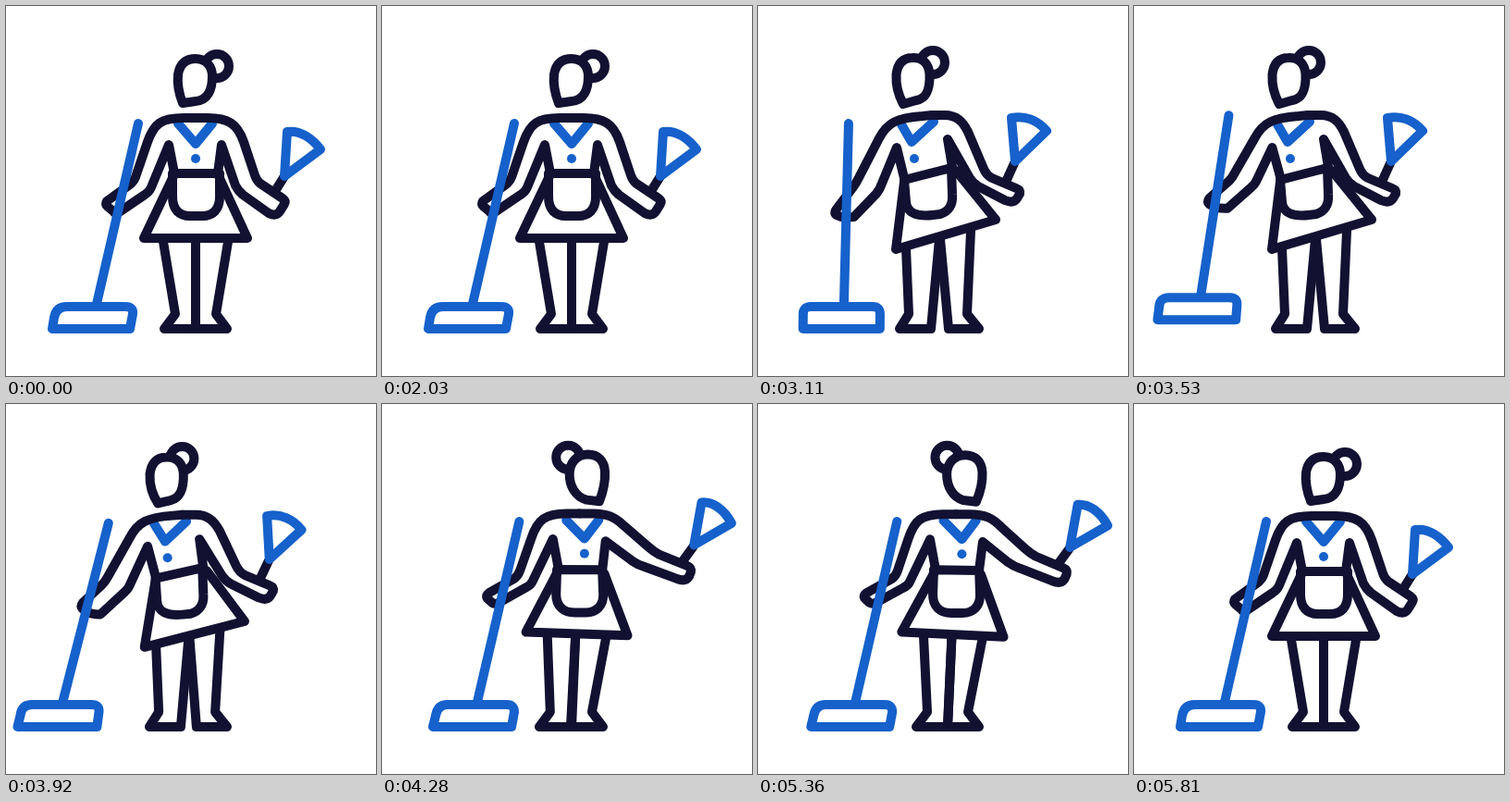
Recreate the animation shown at these times as an HTML page. Size 400x400 px, loop 5870 ms.

```html
<!DOCTYPE html>
<html lang="en">
<head>
<meta charset="utf-8">
<title>Cleaner with mop and duster</title>
<style>
html, body { margin: 0; width: 100%; height: 100%; overflow: hidden; background: #fff; }
svg { display: block; width: 100vw; height: 100vh; }
path { stroke-width: 10; stroke-linecap: round; stroke-linejoin: round; fill: none; }
</style>
</head>
<body>
<svg id="stage" viewBox="0 0 400 400"></svg>
<script>
const LOOP = 5870, DARK = '#121131', BLUE = '#1661cb';
const svg = document.getElementById('stage');

const bun = (x, y) => `M${x - 13},${y} A13,13 0 1 1 ${x + 13},${y} A13,13 0 1 1 ${x - 13},${y}`;
const dot = (x, y) => `M${x},${y} L${x},${y}`;

// Vertical shifts: the body dips between poses, the mop lifts off the floor.
const still = () => 0;
const body = (y, m) => m.dip;
const mop = (y, m) => -m.lift;
const bunShift = (y, m) => m.turning ? -m.dip : m.dip;
const mopArm = (y, m) => {
  const w = clamp((y - 180) / 35);
  return m.dip * (1 - w) - m.lift * w;
};

// Pose order: 0 rest, 1 mop far left, 2 mop pulled in, 3 reaching right.
// Parts with three paths share one shape for poses 1 and 2.
const parts = [
  // legs
  { color: DARK, shift: still, poses: [
    'M170,255 L183,333 L171,349 L205,349 L205,252',
    'M160,262 L163,333 L153,349 L187,349 L196,252',
    'M180,252 L183,333 L171,349 L205,349 L210,250'] },
  { color: DARK, shift: still, poses: [
    'M240,255 L227,333 L239,349 L205,349 L205,252',
    'M230,243 L226,333 L239,349 L206,349 L197,252',
    'M243,253 L227,333 L239,349 L205,349 L210,250'] },
  // collar and button
  { color: BLUE, shift: body, poses: [
    'M186,127 L205,149 L223,127',
    'M155,128 L166,147 L190,125',
    'M202,124 L222,144 L237,124'] },
  { color: BLUE, shift: body, poses: [dot(205, 165), dot(169, 165), dot(222, 160)] },
  // skirt and apron
  { color: DARK, shift: body, poses: [
    'M181,184 L149,251 L261,251 L230,184',
    'M158,190 L149,263 L257,231 L214,178',
    'M191,181 L156,244 L266,250 L242,182'] },
  { color: DARK, shift: body, poses: [
    'M180,181 L231,181 L231,206 C231,220 224,227 212,227 L199,227 C187,227 180,220 180,206 Z',
    'M158,188 L209,175 L210,204 C211,215 206,222 197,225 L189,226 C172,228 161,224 160,212 Z',
    'M191,177 L240,178 L241,205 C241,217 233,224 222,224 L210,224 C197,224 190,216 190,204 Z'] },
  // duster
  { color: DARK, shift: body, wave: true, poses: [
    'M291,200 L301,184', 'M268,190 L277,170', 'M328,168 L340,152'] },
  { color: BLUE, shift: body, wave: true, poses: [
    'M301,184 L304,136 C318,134 331,143 340,155 Z',
    'M278,168 L274,121 C288,118 302,123 312,135 Z',
    'M341,150 L350,104 C362,103 374,112 382,127 Z'] },
  // right arm
  { color: DARK, shift: body, wave: true, poses: [
    'M205,121 L218,121 C240,121 250,127 257,147 L269,183 Q271,189 275,192 L299,208 Q303,211 301,214 L296,222 Q292,228 284,224 L256,204 Q251,200 248,194 L233,150 L229,181',
    'M188,118 L202,118 C214,118 221,124 227,136 L244,176 Q247,183 253,186 L279,197 Q284,199 283,203 L280,208 Q276,214 267,210 L238,195 Q232,191 229,186 L205,144 L210,174',
    'M215,117 L230,117 C246,117 254,121 264,130 L290,151 Q297,157 303,160 L333,172 Q338,174 337,179 L335,184 Q331,190 322,186 L286,173 Q279,171 273,167 L244,147 L240,178'] },
  // left arm
  { color: DARK, shift: mopArm, poses: [
    'M205,121 L192,121 C168,121 160,127 153,147 L140,185 Q138,190 134,193 L109,211 Q107,214 110,217 L116,222 Q118,225 122,223 L150,204 Q155,201 157,196 L176,150 L182,181',
    'M188,118 L178,119 C150,121 139,126 130,143 L105,186 Q102,192 98,196 L79,216 Q76,220 79,223 L84,226 Q89,229 99,229 L125,203 Q129,199 131,193 L149,153 L158,186',
    'M188,118 L178,119 C150,121 140,126 131,143 L109,186 Q106,192 103,196 L85,220 Q82,224 85,226 L90,228 Q95,229 104,228 L128,203 Q132,198 134,192 L150,153 L158,186',
    'M215,117 L201,117 C178,117 170,123 163,145 L152,178 Q150,184 146,187 L118,203 Q114,206 116,209 L121,214 Q124,216 128,214 L158,197 Q163,195 165,190 L187,144 L193,177'] },
  // mop
  { color: BLUE, shift: mop, poses: [
    'M143,127 L98,322', 'M106,129 L56,322', 'M97.5,127 L95,322', 'M151,127 L106,322'] },
  { color: BLUE, shift: mop, poses: [
    'M50,349 L134,349 L137,333 Q138,325 129,325 L66,325 Q54,325 52,337 Z',
    'M7,349 L93,349 L95,333 Q96,325 87,325 L23,325 Q11,325 10,337 Z',
    'M51,349 L134,349 L134,333 Q134,325 126,325 L59,325 Q51,325 51,333 Z',
    'M58,349 L143,349 L146,333 Q146,325 138,325 L74,325 Q63,325 61,337 Z'] },
  // hair bun and head
  { color: DARK, shift: bunShift, poses: [bun(228, 65), bun(189, 61), bun(202, 59)] },
  { color: DARK, shift: body, fill: '#fff', poses: [
    'M191,105 C187,95 185,84 186,74 C188,62 195,57 205,57 C216,57 223,65 223,76 C223,91 218,102 205,103 Z',
    'M157,106 C151,95 149,83 149.5,74 C151,62 157,56 167,56 C178,55 185,63 185.5,74 C186,91 182,100 171,102 Z',
    'M225,102 C213,99 206,88 206,74 C206,62 214,53 226,53 C237,53 244,60 244.5,72 C245,82 243,92 239,104 Z'] }
];

// [time, pose, mop lift and body dip on the way to this pose]
const keys = [
  [0, 0, 0, 0], [2030, 0, 0, 0], [2600, 1, 9, 3], [3200, 2, 0, 0], [3800, 1, 10, 0],
  [4370, 3, 0, 3], [5250, 3, 0, 0], [5810, 0, 0, 3], [LOOP, 0, 0, 0]
];

const NUM = /[\d.]+/g;
for (const p of parts) {
  const [a, b, c, d] = p.poses;
  const all = d ? [a, b, c, d] : [a, b, b, c];
  p.nums = all.map(s => s.match(NUM).map(Number));
  p.shape = a;
  p.isArc = a.includes('A');
  p.el = document.createElementNS('http://www.w3.org/2000/svg', 'path');
  p.el.setAttribute('stroke', p.color);
  if (p.fill) p.el.style.fill = p.fill;
  svg.append(p.el);
}

const clamp = n => Math.min(1, Math.max(0, n));
const ease = p => (1 - Math.cos(Math.PI * p)) / 2;

// Swing points around the right shoulder, growing along the arm.
function swing(v, angle) {
  for (let i = 0; i < v.length; i += 2) {
    const x = v[i] - 255, y = v[i + 1] - 140;
    const a = angle * clamp(x / 45);
    v[i] = 255 + x * Math.cos(a) - y * Math.sin(a);
    v[i + 1] = 140 + x * Math.sin(a) + y * Math.cos(a);
  }
}

function draw(t) {
  let k = 1;
  while (k < keys.length - 1 && t >= keys[k][0]) k++;
  const [t0, from] = keys[k - 1], [t1, to, lift, dip] = keys[k];
  const p = (t - t0) / (t1 - t0), e = ease(p), arch = Math.sin(Math.PI * p);
  const move = { lift: lift * arch, dip: dip * arch, turning: from === 3 || to === 3 };
  const angle = from === 3 && to === 3 ? -0.07 * Math.sin(2 * Math.PI * p) : 0;

  for (const part of parts) {
    const a = part.nums[from], b = part.nums[to];
    const v = a.map((n, i) => n + (b[i] - n) * e);
    if (part.wave && angle) swing(v, angle);
    if (part.isArc) {
      part.el.setAttribute('transform', `translate(0 ${part.shift(0, move)})`);
    } else {
      for (let i = 1; i < v.length; i += 2) v[i] += part.shift(v[i], move);
    }
    let i = 0;
    part.el.setAttribute('d', part.shape.replace(NUM, () => +v[i++].toFixed(2)));
  }
}

const start = performance.now();
function tick() {
  draw((performance.now() - start) % LOOP);
  requestAnimationFrame(tick);
}
tick();
</script>
</body>
</html>
```
